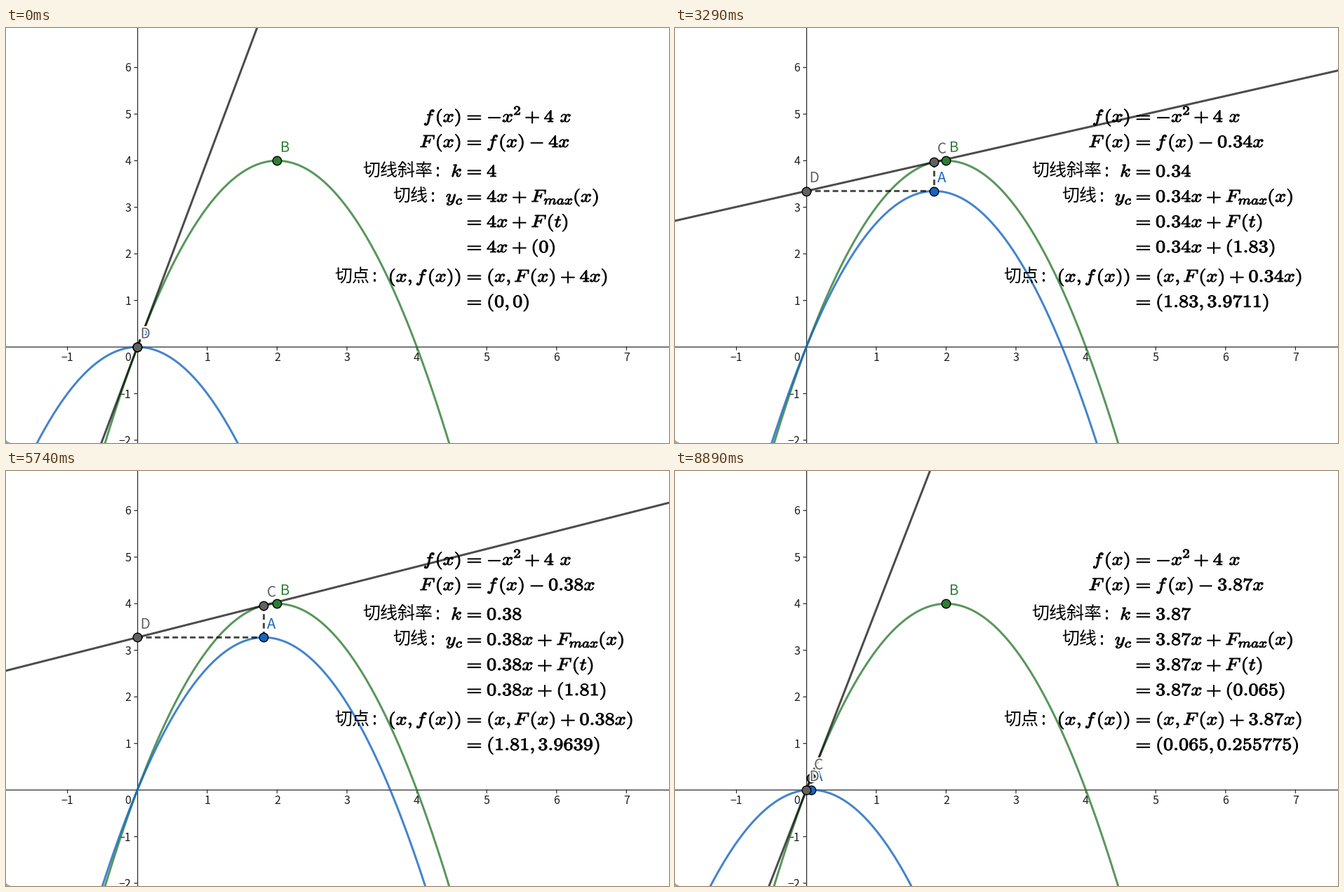
Recreate the animation shown at these times as a matplotlib script. Size 945 by 592 pixels, loop 8960 ms.

```python
from functools import lru_cache

import numpy as np
import matplotlib.pyplot as plt
import matplotlib.patheffects as pe
from matplotlib.animation import FuncAnimation
from matplotlib.patches import PathPatch, Polygon
from matplotlib.path import Path
from matplotlib.textpath import TextPath
from matplotlib.transforms import Affine2D

W, H, DPI = 945, 592, 64
PT = 72 / DPI                      # points per pixel
FRAMES, STEP_MS = 128, 70
OX, OY, UX, UY = 187.2, 455.1, 99.6, 66.45
SANS = "Noto Sans CJK JP"
GREEN, BLUE, GREY = "#2e7d32", "#1565c0", "#616161"

plt.rcParams["mathtext.fontset"] = "cm"
plt.rcParams["lines.scale_dashes"] = False

fig = plt.figure(figsize=(W / DPI, H / DPI), dpi=DPI, facecolor="white")
ax = fig.add_axes([0, 0, 1, 1])
ax.set_xlim(0, W)
ax.set_ylim(H, 0)
ax.axis("off")


def sx(x):
    return OX + UX * x


def sy(y):
    return OY - UY * y


# --- formula typesetting: bold extended Computer Modern -------------------

EM, WIDE, SCRIPT = 24.6, 1.15, .74
ADVANCE = {
    "f": .490, "F": .643, "x": .572, "t": .361, "k": .521, "y": .490,
    "c": .433, "m": .878, "a": .529, "(": .389, ")": .389, ",": .423,
    ".": .278, "+": 1.164, "−": 1.164, "-": .778, "=": .778, " ": .31,
}
ITALIC = {"f": .108, "F": .139, "k": .031}
SHIFT = {"_": .15, "^": -.413}
EQ_X, LEFT_X, RIGHT_X = 656.4, 649.8, 685


@lru_cache(None)
def glyph(c):
    path = TextPath((0, 0), f"${c.replace('−', '-')}$", size=1)
    if c in "+-−=":                # operators sit in the middle of their cell
        box = path.get_extents()
        dx = ADVANCE[c] / 2 - (box.x0 + box.x1) / 2
        path = path.transformed(Affine2D().translate(dx, 0))
    return path


def typeset(s, x, y, right=False):
    """Glyph paths of s; '_' and '^' turn the next character into a script."""
    placed, pen, i = [], 0, 0
    while i < len(s):
        size, dy = 1, 0
        if s[i] in SHIFT:
            size, dy = SCRIPT, SHIFT[s[i]]
            i += 1
        c = s[i]
        if c != " ":
            placed.append((c, pen, size, dy))
        pen += ADVANCE.get(c, .5) * size
        if s[i + 1:i + 2] != "_":
            pen += ITALIC.get(c, 0) * size
        i += 1
    if right:
        x -= pen * EM * WIDE
    return [
        glyph(c).transformed(
            Affine2D().scale(EM * WIDE * size, -EM * size)
            .translate(x + p * EM * WIDE, y + dy * EM))
        for c, p, size, dy in placed
    ]


def num(v):
    s = f"{v:.6f}".rstrip("0").rstrip(".")
    return "0" if s == "-0" else s


# --- fixed scenery --------------------------------------------------------

AXIS = dict(color="#303030", lw=1.3 * PT, zorder=1, snap=False)
ax.plot([0, W], [OY, OY], **AXIS)
ax.plot([OX + .4, OX + .4], [0, H], **AXIS)
ax.add_patch(Polygon([(0, 587.5), (2.5, 590), (7, H), (0, H)],
                     color="#a8a8a8", lw=0, zorder=1))


def axis_label(x, y, n, ha):
    ax.text(x, y, str(n).replace("-", "−"), ha=ha, va="baseline",
            family=SANS, fontsize=16 * PT, color="#1c1c1c", zorder=1)


for n in range(-1, 8):
    if n:
        ax.plot([sx(n)] * 2, [OY, OY + 4], **AXIS)
        axis_label(sx(n), 475.3, n, "center")
for n in range(-2, 7):
    if n:
        ax.plot([OX - 4, OX], [sy(n)] * 2, **AXIS)
        axis_label(178.5, sy(n) + 6, n, "right")
axis_label(178.5, 475.3, 0, "right")

xs = np.linspace(-2.5, 6.5, 400)
ends = np.array([-3, 9])


def curve(color, alpha, z, **kw):
    return ax.plot([], [], color=color, alpha=alpha, lw=3 * PT, zorder=z,
                   snap=False, **kw)[0]


curve(GREEN, .8, 2).set_data(sx(xs), sy(4 * xs - xs ** 2))
parabola = curve(BLUE, .8, 3)
tangent = curve("black", .7, 4)
dash = dict(linestyle=(0, (8 * PT, 4.5 * PT)), dash_capstyle="butt")
across = curve("black", .7, 5, **dash)
upright = curve("black", .7, 5, **dash)


class Point:
    def __init__(self, name, color, z):
        self.dot = ax.plot([], [], "o", ms=12.5 * PT, mfc=color, mec="black",
                           mew=1.4 * PT, zorder=z, snap=False)[0]
        self.tag = ax.text(0, 0, name, color=color, family=SANS,
                           fontsize=20.5 * PT, va="baseline", zorder=z + .5)
        self.tag.set_path_effects(
            [pe.withStroke(linewidth=3.8 * PT, foreground="white")])

    def move(self, x, y):
        self.dot.set_data([sx(x)], [sy(y)])
        self.tag.set_position((sx(x) + 4.5, sy(y) - 12.5))


Point("B", GREEN, 6).move(2, 4)
pt_a, pt_c, pt_d = Point("A", BLUE, 7), Point("C", GREY, 8), Point("D", GREY, 9)

CJK = 25


def caption(s, x):
    style = dict(family=SANS, fontsize=CJK * PT, color="black",
                 va="baseline", zorder=12)
    return [ax.text(x, 0, s, **style),
            ax.text(x + CJK * len(s) + 3, 0, ":", **style)]


captions = {2: caption("切线斜率", 508), 3: caption("切线", 551),
            6: caption("切点", 468)}
formulas = PathPatch(Path([(0, 0)]), fc="black", ec="black", lw=.95 * PT,
                     joinstyle="round", zorder=12)
ax.add_patch(formulas)

BASELINES = [134, 170, 212, 248, 284, 320, 362, 398]

# --- motion: the slope runs 4 -> -1 -> 4 in hundredths --------------------

KEY_AT = [0, 15, 34, 59, 64, 82, 104, 127]
KEY_STEP = [0, 117, 265, 460, 500, 638, 811, 987]


def slope(i):
    step = round(float(np.interp(i, KEY_AT, KEY_STEP)))
    return 4 - (500 - abs(500 - step)) / 100


def draw(i):
    k = slope(i)
    t = 2 - k / 2
    y = 4 * t - t * t
    top = t * t

    parabola.set_data(sx(xs), sy((4 - k) * xs - xs ** 2))
    tangent.set_data(sx(ends), sy(k * ends + top))
    across.set_data([sx(0), sx(t)], [sy(top)] * 2)
    upright.set_data([sx(t)] * 2, [sy(y), sy(top)])
    pt_a.move(t, top)
    pt_c.move(t, y)
    pt_d.move(0, top)

    ks, ts, ys = num(k), num(t), num(y)
    rows = [
        ("f(x)", "-x^2+4 x"),
        ("F(x)", f"f(x)−{ks}x"),
        ("k", ks),
        ("y_c", f"{ks}x+F_m_a_x(x)"),
        ("", f"{ks}x+F(t)"),
        ("", f"{ks}x+({ts})"),
        ("(x,f(x))", f"(x,F(x)+{ks}x)"),
        ("", f"({ts},{ys})"),
    ]
    paths = []
    for r, (lhs, rhs) in enumerate(rows):
        base = BASELINES[r] + (3.3 if k < 0 and r > 2 else 0)
        paths += typeset(lhs, LEFT_X, base, right=True)
        paths += typeset("=", EQ_X, base)
        paths += typeset(rhs, RIGHT_X, base)
        for text in captions.get(r, []):
            text.set_y(base)
    formulas.set_path(Path.make_compound_path(*paths))
    return []


anim = FuncAnimation(fig, draw, frames=FRAMES, interval=STEP_MS,
                     init_func=lambda: draw(0), repeat=True, repeat_delay=0)
plt.show()
```
